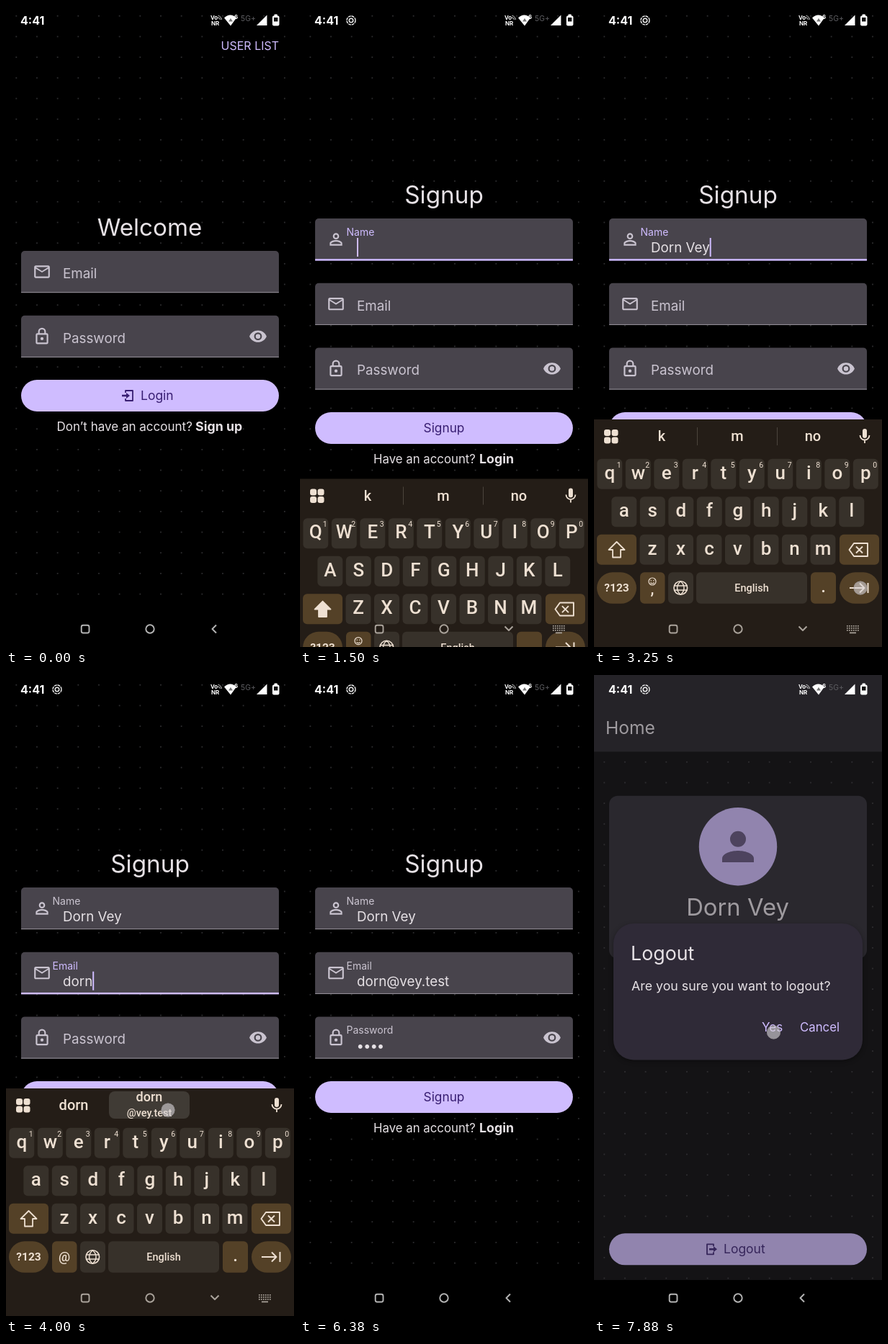
Write an HTML page with a canvas that moves like this. It is 400x890 px and loops after 8 s.

```html
<!DOCTYPE html>
<html lang="en">
<head>
<meta charset="utf-8">
<title>Sign-up flow</title>
<style>
html, body { margin: 0; width: 100%; height: 100%; overflow: hidden; background: #000; }
canvas { display: block; width: 400px; height: 890px; }
</style>
</head>
<body>
<canvas id="stage"></canvas>
<script>
const LOOP = 8000, W = 400, H = 890;
const canvas = document.getElementById('stage');
const ctx = canvas.getContext('2d');
const ratio = window.devicePixelRatio || 1;
canvas.width = W * ratio;
canvas.height = H * ratio;

const LILAC = '#cfbcff', INK = '#381e72', PALE = '#e6e1e5', SOFT = '#cac4d0';
const KEY = '#37312a', ACCENT = '#544127', KEY_TEXT = '#eee0d2';
const NAME = 'Dorn Vey', EMAIL = 'dorn@vey.test';

const T = { badge: 130, signup: 1000, name: 1320, email: 3300, password: 4300, blur: 5680, home: 6600, dialog: 7400 };

const ICONS = {
  mail: 'M22 6c0-1.1-.9-2-2-2H4c-1.1 0-2 .9-2 2v12c0 1.1.9 2 2 2h16c1.1 0 2-.9 2-2V6zm-2 0l-8 5-8-5h16zm0 12H4V8l8 5 8-5v10z',
  lock: 'M12 13a2 2 0 1 0 0 4a2 2 0 0 0 0-4zM6 10v10h12V10zM18 8a2 2 0 0 1 2 2v10a2 2 0 0 1-2 2H6a2 2 0 0 1-2-2V10a2 2 0 0 1 2-2h1V6a5 5 0 0 1 10 0v2zM12 3a3 3 0 0 0-3 3v2h6V6a3 3 0 0 0-3-3z',
  person: 'M12 4a4 4 0 1 1 0 8a4 4 0 0 1 0-8zm0 2a2 2 0 1 0 0 4a2 2 0 0 0 0-4zm0 7c2.67 0 8 1.33 8 4v3H4v-3c0-2.67 5.33-4 8-4zm0 1.9c-2.97 0-6.1 1.46-6.1 2.1v1.1h12.2V17c0-.64-3.13-2.1-6.1-2.1z',
  eye: 'M12 9a3 3 0 1 0 0 6a3 3 0 0 0 0-6zm0 8a5 5 0 1 1 0-10a5 5 0 0 1 0 10zm0-12.5C7 4.5 2.73 7.61 1 12c1.73 4.39 6 7.5 11 7.5s9.27-3.11 11-7.5c-1.73-4.39-6-7.5-11-7.5z'
};
for (const k in ICONS) ICONS[k] = new Path2D(ICONS[k]);

const clamp = v => Math.max(0, Math.min(1, v));
const ramp = (t, start, length) => clamp((t - start) / length);
const easeOut = p => 1 - (1 - p) ** 3;
const mix = (a, b, p) => a + (b - a) * p;

function box(x, y, w, h, r, fill) {
  ctx.beginPath();
  ctx.roundRect(x, y, w, h, r);
  ctx.fillStyle = fill;
  ctx.fill();
}
function disc(x, y, r, fill) {
  ctx.beginPath();
  ctx.arc(x, y, r, 0, 7);
  ctx.fillStyle = fill;
  ctx.fill();
}
function ring(x, y, r, color, width) {
  ctx.beginPath();
  ctx.arc(x, y, r, 0, 7);
  ctx.strokeStyle = color;
  ctx.lineWidth = width;
  ctx.stroke();
}
function stroke(path, color, width) {
  ctx.strokeStyle = color;
  ctx.lineWidth = width;
  ctx.stroke(new Path2D(path));
}
function fillPath(path, color) {
  ctx.fillStyle = color;
  ctx.fill(new Path2D(path));
}
function text(s, x, y, size, color, align = 'left', weight = 400, family = 'Inter') {
  ctx.font = `${weight} ${size}px ${family}, sans-serif`;
  ctx.textAlign = align;
  ctx.fillStyle = color;
  ctx.fillText(s, x, y);
  return ctx.measureText(s).width;
}
function icon(name, x, y, color) {
  ctx.save();
  ctx.translate(x - 13, y - 13);
  ctx.scale(26 / 24, 26 / 24);
  ctx.fillStyle = color;
  ctx.fill(ICONS[name], 'evenodd');
  ctx.restore();
}

// Keyboard geometry
const PITCH = 39.5;
const ROWS = [['qwertyuiop', 21.8, 628.7], ['asdfghjkl', 41.8, 681.2], ['zxcvbnm', 81, 733.8]];
function keyCentre(ch) {
  for (const [letters, x, y] of ROWS) {
    const i = letters.indexOf(ch.toLowerCase());
    if (i >= 0) return [x + i * PITCH, y + 21];
  }
  return [219, 808];
}

const typed = (field, word, times) =>
  times.map((at, i) => ({ at, field, value: word.slice(0, i + 1), key: word[i] }));
const edits = [
  ...typed(0, NAME, [1900, 2030, 2160, 2300, 2490, 2820, 2960, 3100]),
  ...typed(1, 'dorn', [3540, 3650, 3760, 3870]),
  { at: 4110, field: 1, value: EMAIL },
  ...typed(2, 'dorn', [4500, 4650, 4800, 4950])
];
const touches = [
  [130, 340, 296, 585], [1120, 1260, 205, 326], [2640, 2720, 32, 757],
  [3220, 3320, 370, 808], [3930, 4090, 225, 604], [4230, 4320, 370, 808],
  [5600, 5700, 370, 808], [6220, 6360, 205, 588], [7250, 7390, 214, 800], [7840, 8000, 249.5, 496],
  ...edits.filter(e => e.key).map(e => [e.at - 25, e.at + 60, ...keyCentre(e.key)])
];

const focusTimes = [T.name, T.email, T.password];
const focusAt = t => t < T.name || t >= T.blur ? -1 : t < T.email ? 0 : t < T.password ? 1 : 2;
const lastEdit = (t, field) => edits.filter(e => e.field === field && e.at <= t).pop();

function dots(top) {
  ctx.fillStyle = '#2d2d2f';
  for (let y = top + 13.8; y < 840; y += 28.67)
    for (let x = 14.3; x < W; x += 28.67) ctx.fillRect(x - .9, y - .9, 1.8, 1.8);
}

function field(label, glyph, y, { float = 0, focused = false, value = '', caret = false } = {}) {
  box(21, y, 358, 58, [5, 5, 0, 0], '#48444c');
  ctx.fillStyle = focused ? LILAC : '#9b969f';
  ctx.fillRect(21, focused ? y + 56.2 : y + 57.2, 358, focused ? 2.5 : 1);
  icon(glyph, 50, y + 29, SOFT);
  if (label === 'Password') icon('eye', 350, y + 29, SOFT);
  text(label, mix(79, 64.5, float), mix(y + 38, y + 24, float), mix(18.8, 14, float), focused ? LILAC : SOFT);
  const masked = label === 'Password';
  const width = value ? text(value, 79, y + 47, 18.8, PALE, 'left', masked ? 600 : 400) : 0;
  if (caret) {
    ctx.fillStyle = LILAC;
    ctx.fillRect(79 + width, y + 27, 2, 26);
  }
}

function button(y, label, arrow) {
  box(21, y, 358, 44, 22, LILAC);
  if (!arrow) return text(label, 200, y + 28, 17.3, INK, 'center');
  const out = arrow === 'out';
  ctx.save();
  ctx.translate(out ? 163 : 169, y + 22);
  if (out) {
    stroke('M3-4V-7H-6V7H3V4', INK, 1.8);
    stroke('M-3 0H4', INK, 2.6);
    fillPath('M3-4L8 0L3 4Z', INK);
  } else {
    stroke('M-3-4V-7H7V7H-3V4', INK, 1.8);
    stroke('M-8 0H-1', INK, 2.6);
    fillPath('M-2-4L3 0L-2 4Z', INK);
  }
  ctx.restore();
  text(label, out ? 180 : 187, y + 28, 17.5, INK);
}

function login() {
  dots(0);
  text('USER LIST', 379, 60.5, 16, LILAC, 'right');
  text('Welcome', 199.5, 319, 33.2, PALE, 'center');
  field('Email', 'mail', 340);
  field('Password', 'lock', 429.7);
  button(519, 'Login', 'in');
  text('Don’t have an account?', 70.5, 589.5, 17, PALE);
  text('Sign up', 263, 589.5, 17.8, PALE, 'left', 700);
}

function signup(t) {
  dots(0);
  text('Signup', 200, 273.5, 33.3, PALE, 'center');
  const focus = focusAt(t);
  [['Name', 'person'], ['Email', 'mail'], ['Password', 'lock']].forEach(([label, glyph], i) => {
    const edit = lastEdit(t, i);
    let value = edit ? edit.value : '';
    if (i === 2 && value) {
      const shown = t - edit.at < 700 ? 1 : 0;
      value = '•'.repeat(value.length - shown) + value.slice(value.length - shown);
    }
    const since = t - Math.max(focusTimes[i], edit ? edit.at : 0);
    field(label, glyph, 295 + i * 89.7, {
      float: easeOut(ramp(t, focusTimes[i], 150)),
      focused: focus === i, value,
      caret: focus === i && since % 1000 < 500
    });
  });
  button(564, 'Signup');
  text('Have an account?', 102, 634.5, 16.8, PALE);
  text('Login', 249, 634.5, 17.8, PALE, 'left', 700);
}

function home() {
  dots(107);
  box(0, 0, W, 106.5, 0, '#1c1b1f');
  text('Home', 16, 82, 24.6, PALE);
  box(21, 167.7, 358, 226, 12, '#25232a');
  disc(200, 238.3, 54.2, LILAC);
  disc(200, 227.8, 11, '#5e5079');
  fillPath('M178 260V255C178 247 192 244 200 244S222 247 222 255V260Z', '#5e5079');
  text(NAME, 199.5, 334, 32.8, PALE, 'center');
  text(EMAIL, 199, 371, 19, PALE, 'center');
  button(775.3, 'Logout', 'out');
}

function dialog(p) {
  ctx.save();
  ctx.globalAlpha = p;
  box(0, 0, W, 840, 0, 'rgba(50,48,53,.4)');
  ctx.shadowColor = 'rgba(0,0,0,.35)';
  ctx.shadowBlur = 6 * ratio;
  ctx.shadowOffsetY = 2 * ratio;
  box(27, 345, 346, 189.5, 28, '#2f2a37');
  ctx.shadowColor = 'transparent';
  text('Logout', 51, 396, 26.8, PALE);
  text('Are you sure you want to logout?', 52, 438, 17.8, PALE);
  text('Yes', 233, 495, 17, LILAC);
  text('Cancel', 286, 495, 16.8, LILAC);
  ctx.restore();
}

const keyText = (s, x, y, size = 26, weight = 500) => text(s, x, y, size, KEY_TEXT, 'center', weight, 'Roboto');

function suggestions(t) {
  for (const x of [14, 24.5]) for (const y of [588, 598.5]) box(x, y, 9, 9, 3, KEY_TEXT);
  box(373, 587, 6, 13, 3, KEY_TEXT);
  stroke('M369.5 596A6.5 6.5 0 0 0 382.5 596M376 602.5V607', KEY_TEXT, 1.8);
  const edit = lastEdit(t, 1);
  const pressed = t > 3930 && t < 4100;
  if (pressed) box(143, 578, 112, 38, 8, '#403b35');
  else for (const x of [143, 254]) box(x, 585, 1, 25, 0, '#4b443c');
  if (focusAt(t) === 0) {
    ['k', 'm', 'no'].forEach((s, i) => keyText(s, 94 + i * 105, 604, 20));
  } else if (edit) {
    keyText(edit.value, 94, 604, edit.value === EMAIL ? 15 : 20);
    if (edit.value === 'dorn') {
      keyText('dorn', 199, 592, 18);
      keyText('@vey.test', 199, 613, 14.5);
    }
  }
}

function keyboard(t, p) {
  ctx.save();
  ctx.translate(0, (1 - p) * 316);
  box(0, 574, W, 316, 0, '#241d17');
  const focus = t < T.email ? 0 : t < T.password ? 1 : 2;
  const upper = t < 1900 || (t > 2680 && t < 2820);
  const lit = edits.find(e => e.key && t >= e.at - 25 && t < e.at + 60);
  if (focus === 2) for (let i = 0; i < 10; i++) keyText((i + 1) % 10, 22 + i * PITCH, 606, 25);
  else suggestions(t);

  ROWS.forEach(([letters, x0, y], row) => [...letters].forEach((ch, i) => {
    const x = x0 + i * PITCH;
    const on = lit && lit.key.toLowerCase() === ch;
    box(x - 17.5, y, 35, 42, 6, on ? '#4b443b' : KEY);
    keyText(upper ? ch.toUpperCase() : ch, x, y + 28);
    if (row === 0 && focus < 2) keyText((i + 1) % 10, x + 13, y + 12, 10.5, 400);
  }));

  box(4, 733.8, 55, 42, 6, ACCENT);
  box(341, 733.8, 55, 42, 6, ACCENT);
  const shift = 'M31.5 744L42.5 755H37V765.5H26V755H20.5Z';
  if (upper) fillPath(shift, KEY_TEXT);
  stroke(shift, KEY_TEXT, 1.8);
  stroke('M361 746H380V764H361L354.5 755ZM364 750.5L373 759.5M373 750.5L364 759.5', KEY_TEXT, 1.9);

  box(4, 786.3, 55, 43.5, 22, ACCENT);
  box(64, 786.3, 34.5, 43.5, 6, ACCENT);
  box(103, 786.3, 35, 43.5, 6, KEY);
  box(142, 786.3, 154, 43.5, 6, KEY);
  box(301, 786.3, 35, 43.5, 6, ACCENT);
  box(341, 786.3, 55, 43.5, 22, ACCENT);
  keyText('?123', 31.5, 813, 15.5, 700);
  keyText('English', 219, 813, 14.5);
  keyText('.', 318.5, 814, 24);
  if (focus === 0) {
    ring(81, 799, 5, KEY_TEXT, 1.2);
    stroke('M78.5 800.5Q81 803.5 83.5 800.5M79.2 797V798.4M82.8 797V798.4', KEY_TEXT, 1.2);
    keyText(',', 81, 817, 22);
  } else keyText(focus === 1 ? '@' : ',', 81, 813.5, focus === 1 ? 18 : 24);
  ring(120.3, 808, 9.3, KEY_TEXT, 1.6);
  stroke('M111 805H129.6M111 811H129.6M120.3 798.7C114 804 114 812 120.3 817.3C126.6 812 126.6 804 120.3 798.7', KEY_TEXT, 1.5);
  stroke(focus === 2 ? 'M358 808H377M371 801.5L377.5 808L371 814.5'
                     : 'M355 808H375M369 801.5L375.5 808L369 814.5M380.5 801V815', KEY_TEXT, 2);
  ctx.restore();
}

function statusBar(t) {
  text('4:41', 20, 26, 16, '#fff', 'left', 700);
  if (t >= T.badge) {
    ring(71, 20, 2.8, '#eee', 1.5);
    ctx.setLineDash([3.7, 1]);
    ring(71, 20, 6, '#eee', 1.5);
    ctx.setLineDash([]);
  }
  text('Vo', 284, 19, 7.8, '#fff', 'left', 700);
  text('NR', 285, 26.5, 8, '#fff', 'left', 700);
  stroke('M294 16Q297 16 297.5 19M294.5 13.5Q298.5 14 299.5 19', '#ddd', 1);
  fillPath('M303 16.5Q311.5 8.5 320 16.5L312 27.5Z', '#fff');
  fillPath('M309 21.5L312 17L315 21.5Z', '#777');
  text('6', 317, 18, 8, '#fff', 'left', 700);
  text('5G+', 326, 20.5, 10.4, '#5c5c60');
  fillPath('M348 27H362.5V12.5Z', '#fff');
  box(372.5, 11.5, 4.5, 3, 1, '#fff');
  box(370, 13.5, 9.5, 14, 2, '#fff');
  box(372, 16, 5.5, 5.5, 0, '#111');
}

function navBar(t, keyboardOpen) {
  const color = t >= T.home && t < T.dialog ? '#fff' : keyboardOpen ? '#aaa39b' : '#b4b4b4';
  ctx.beginPath();
  ctx.roundRect(104.7, 859.7, 10.8, 10.8, 2.5);
  ctx.strokeStyle = color;
  ctx.lineWidth = 1.9;
  ctx.stroke();
  ring(200, 865, 5.7, color, 1.9);
  stroke(keyboardOpen ? 'M284.5 861.5L290 867L295.5 861.5' : 'M292 859.5L286.5 865L292 870.5', color, 2);
  if (keyboardOpen) {
    ctx.fillStyle = color;
    for (let r = 0; r < 3; r++)
      for (let c = 0; c < 6; c++) ctx.fillRect(351 + c * 3, 860 + r * 3, 1.7, 1.7);
    ctx.fillRect(355, 869.5, 9, 1.7);
  }
}

function draw(t) {
  ctx.setTransform(ratio, 0, 0, ratio, 0, 0);
  ctx.lineJoin = 'round';
  box(0, 0, W, H, 0, '#000');
  if (t < T.signup) login();
  else if (t < T.home) signup(t);
  else home();
  if (t >= T.dialog) dialog(easeOut(ramp(t, T.dialog, 200)));

  const open = easeOut(ramp(t, T.name + 80, 280)) * (1 - ramp(t, T.blur + 20, 250) ** 2);
  if (open > 0) keyboard(t, open);
  statusBar(t);
  navBar(t, open > .4);

  for (const [from, to, x, y] of touches) {
    if (t < from || t >= to) continue;
    disc(x, y, 9.5, 'rgba(215,212,215,.62)');
    ring(x, y, 9, 'rgba(150,145,150,.6)', 1);
  }
}

const start = performance.now();
function frame() {
  draw((performance.now() - start) % LOOP);
  requestAnimationFrame(frame);
}
frame();
</script>
</body>
</html>
```
